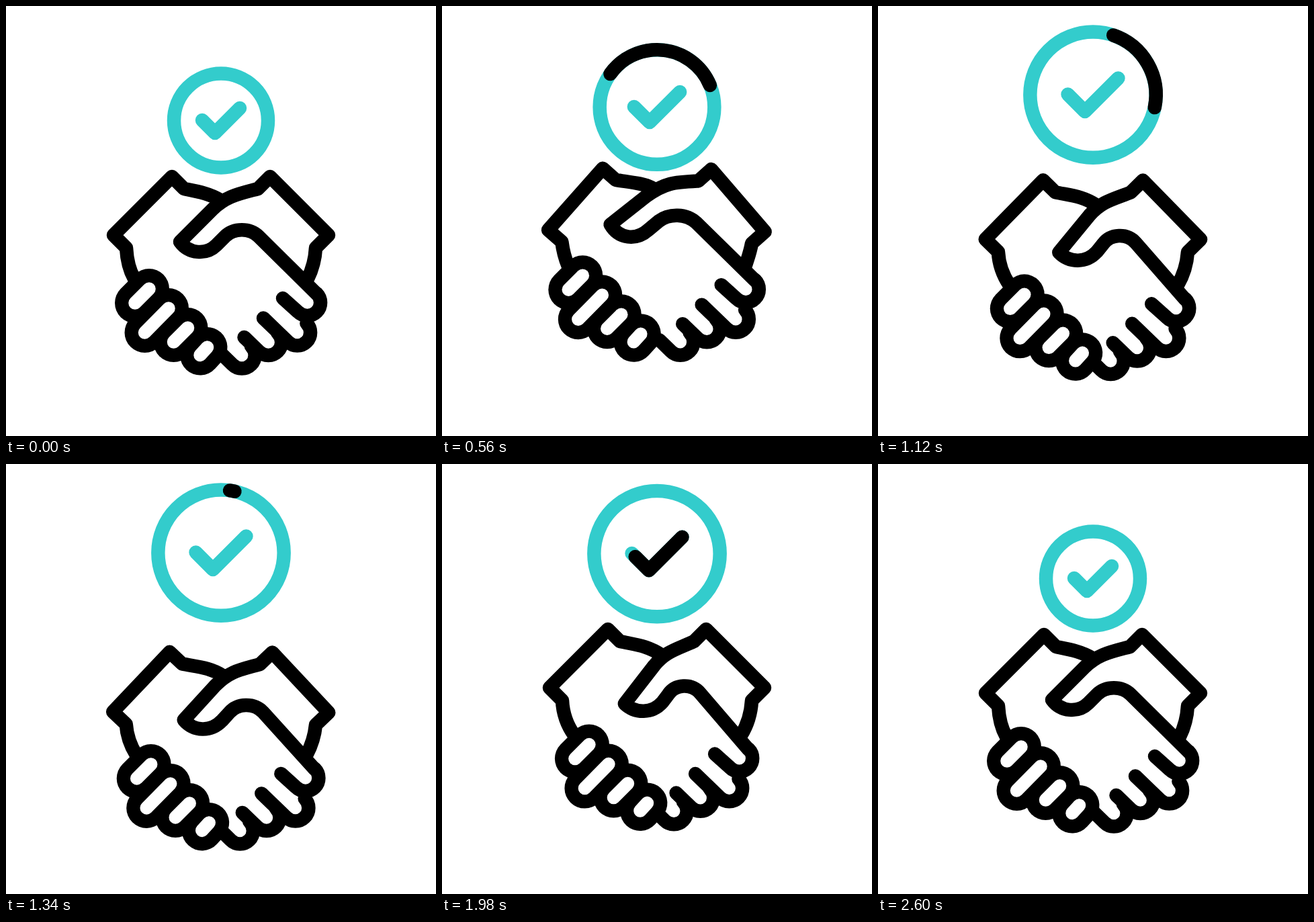
Animation of 640 by 640 pixels, one loop 3000 ms. Source, as an HTML page with a canvas:

```html
<!DOCTYPE html>
<html lang="en">
<head>
<meta charset="utf-8">
<title>Handshake</title>
<style>
  html, body { margin: 0; height: 100%; overflow: hidden; background: #fff; }
  canvas { display: block; width: 100vmin; height: 100vmin; }
</style>
</head>
<body>
<canvas id="stage" width="640" height="640"></canvas>
<script>
const ctx = document.getElementById('stage').getContext('2d');
const LOOP = 3000, STEP = 20, STROKE = 20.5;
const TEAL = '#33cccc', BLACK = '#000', WHITE = '#fff';

// Sleeves, wrists and thumb in three poses; the commands match so they can be blended.
const REST = `M319 289C303 279 285 276 265 272L247 254L160 341L179 360C180 378 184 394 191 406
  M449 406C456 392 460 378 461 360L480 341L393 254L375 272C345 280 328 283 308 302L259 351
  C272 369 298 371 313 356L326 343C339 330 363 330 376 343L462 428`;
const UP = `M309 280C298 275 280 274.5 255 271L235 254.5L157 348.5L178 365.5C180 376 182 384 186 396
  M453 396C455 385 458 379 461 369L481 352.5L405 256.5L385 273.5C347 272 334 271 302 292L246 330.5
  C258 354 284 357 304 340L321 327C337 316 364 316 380 331L468 417`;
const DOWN = `M328 293C306 278 288 277 265 272L247 254L160 341L179 360C180 382 187 398 197 412
  M445 412C455 396 460 378 461 360L480 341L393 254L375 272C349 284 333 287 316 308L272 365
  C288 380 313 380 328 363L337 351C347 336 371 334 384 349L456 433`;

// Left fingers as capsules: upper end, lower end
const LEFT_FINGERS = [
  [213, 421, 192, 442], [242, 450, 206.5, 486],
  [270.5, 479, 249.5, 500], [299.5, 508, 289, 519.5]
];
// Right fingers: tip centre, then the end of the slot below
const RIGHT_FINGERS = [
  [448.5, 441.5, 412, 435], [433.5, 486, 383, 464.5],
  [390.5, 500.5, 354.5, 493], [351, 520, 320, 517]
];

const smooth = u => u * u * (3 - 2 * u);

// Eased value from a flat list of time, value pairs
function track(t, keys) {
  if (t <= keys[0]) return keys[1];
  for (let i = 2; i < keys.length; i += 2) {
    if (t < keys[i]) {
      const u = (t - keys[i - 2]) / (keys[i] - keys[i - 2]);
      return keys[i - 1] + (keys[i + 1] - keys[i - 1]) * smooth(u);
    }
  }
  return keys[keys.length - 1];
}

const numbers = path => path.match(/[\d.]+/g).map(Number);
const rest = numbers(REST), up = numbers(UP), down = numbers(DOWN);

function blendPose(u, d) {
  let i = 0;
  return new Path2D(REST.replace(/[\d.]+/g, () => {
    const r = rest[i], value = r + u * (up[i] - r) + d * (down[i] - r);
    i++;
    return value.toFixed(2);
  }));
}

function stroke(color, width, path) {
  ctx.strokeStyle = color;
  ctx.lineWidth = width;
  path ? ctx.stroke(path) : ctx.stroke();
}

function drawHands(t) {
  const u = track(t, [200, 0, 800, 1, 1200, 0, 1600, 1, 2000, 0]);
  const d = track(t, [800, 0, 1200, 1, 1600, 0, 2000, 1, 2600, 0]);
  const dx = 6 * d - 5.7 * u, dy = 4.7 * d - 11.2 * u;

  ctx.save();
  ctx.translate(0, track(t, [200, 0, 900, -24, 1300, 27, 1700, -19.5, 2200, 0]));
  stroke(BLACK, STROKE, blendPose(u, d));

  ctx.save();
  ctx.translate(-dx, dy);
  for (const [x, y, slotX, slotY] of RIGHT_FINGERS) {
    ctx.beginPath();
    ctx.arc(x, y, 19.6, -Math.PI / 4, Math.PI * 3 / 4);
    ctx.lineTo(slotX, slotY);
    stroke(BLACK, STROKE);
  }
  ctx.restore();

  ctx.translate(dx, dy);
  for (const [color, width] of [[BLACK, 60], [WHITE, 19.5]]) {
    for (const [x1, y1, x2, y2] of LEFT_FINGERS) {
      ctx.beginPath();
      ctx.moveTo(x1, y1);
      ctx.lineTo(x2, y2);
      stroke(color, width);
    }
  }
  ctx.restore();
}

function drawBadge(t) {
  const scale = track(t, [200, 1, 800, 1.338, 2000, 1.338, 2600, 1]);
  const radius = 70 * scale, turn = Math.PI * 2;
  ctx.save();
  ctx.translate(320, track(t, [200, 170.5, 900, 132.2, 1900, 132.2, 2600, 170.5]));

  ctx.beginPath();
  ctx.arc(0, 0, radius, 0, turn);
  stroke(TEAL, STROKE);

  // Black segment running anticlockwise round the ring
  const head = track(t, [200, 0, 1100, 1]), tail = track(t, [500, 0, 1400, 1]);
  if (head > tail) {
    const origin = -track(t, [200, 0, 1400, 82.6]) / 360;
    ctx.beginPath();
    ctx.arc(0, 0, radius, turn * (origin - head), turn * (origin - tail));
    stroke(BLACK, STROKE);
  }

  const tick = new Path2D();
  tick.moveTo(-28 * scale, -0.5 * scale);
  tick.lineTo(-9 * scale, 18.5 * scale);
  tick.lineTo(28 * scale, -18.5 * scale);
  stroke(TEAL, STROKE, tick);

  const end = track(t, [1400, 0, 1900, 1]), start = track(t, [1900, 0, 2400, 1]);
  if (end > start) {
    const length = scale * (Math.hypot(19, 19) + Math.hypot(37, 37));
    ctx.setLineDash([length * (end - start), length * 2]);
    ctx.lineDashOffset = -length * start;
    stroke(BLACK, STROKE, tick);
  }
  ctx.restore();
}

function draw(now) {
  const t = Math.floor((now % LOOP) / STEP) * STEP;
  ctx.fillStyle = WHITE;
  ctx.fillRect(0, 0, 640, 640);
  ctx.lineCap = ctx.lineJoin = 'round';
  drawHands(t);
  drawBadge(t);
}

const begin = performance.now();
function loop() {
  draw(performance.now() - begin);
  requestAnimationFrame(loop);
}
loop();
</script>
</body>
</html>
```
